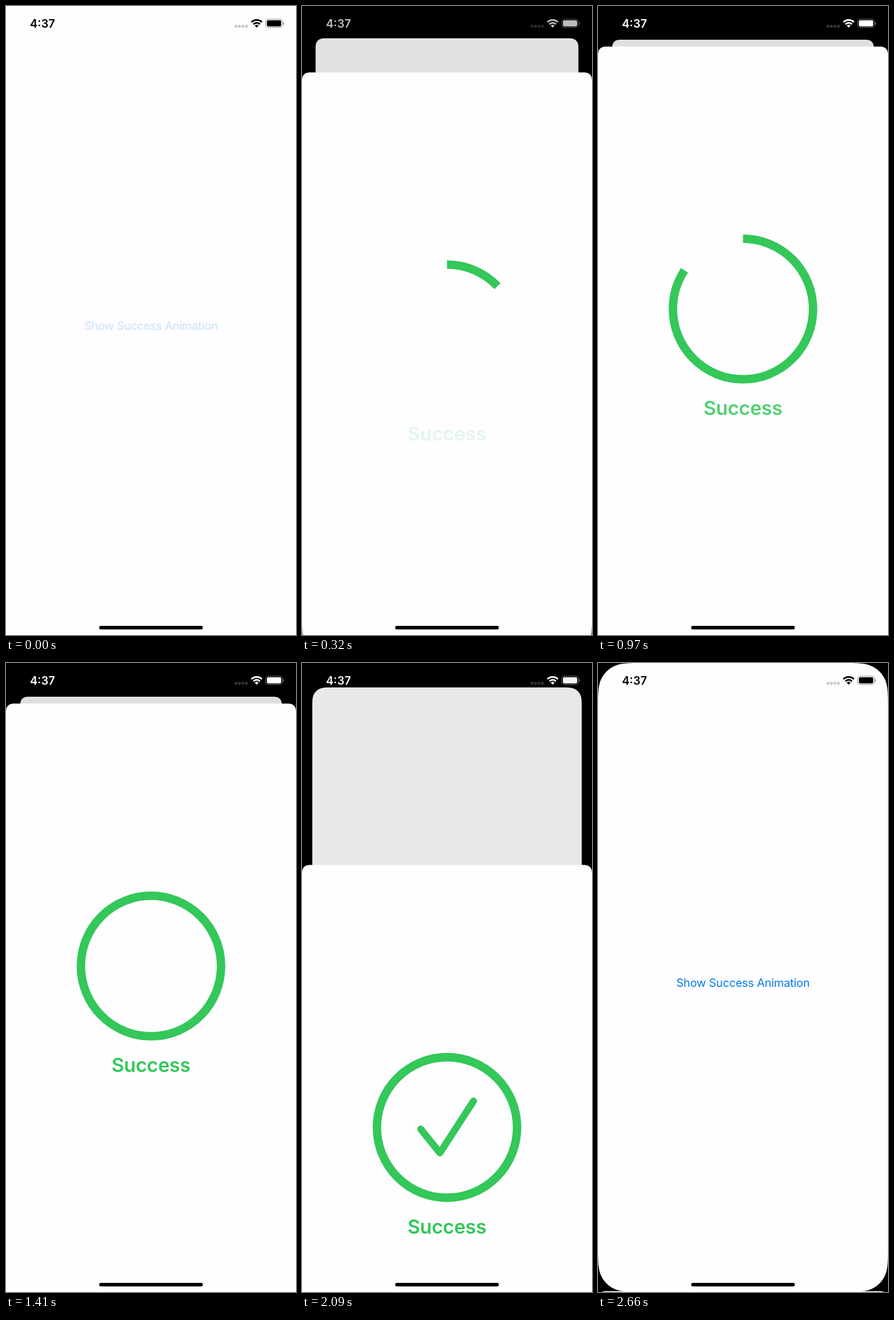
Write an HTML page with a canvas that moves like this. It is 509x1101 px and loops after 2780 ms.

```html
<!DOCTYPE html>
<html lang="en">
<head>
<meta charset="utf-8">
<title>Success animation</title>
<style>
  html, body { margin: 0; width: 100%; height: 100%; overflow: hidden; background: #000; }
  canvas { display: block; width: 509px; height: 1101px; }
</style>
</head>
<body>
<canvas id="stage"></canvas>
<script>
const W = 509, H = 1101, LOOP = 2780;
const PRESENT = 120, SETTLED = 680, DISMISS = 2010;
const WHITE = '#fefdff', GREEN = '#34c759', BLUE = '#047bec';
const SHEET_Y = 71, CARD_Y = 59, CARD_SCALE = 0.902;
const SCREEN_R = 51, CARD_R = 12.3;
const FONT = 'Inter, "Open Sans", sans-serif';

const canvas = document.getElementById('stage');
const ctx = canvas.getContext('2d');
const dpr = window.devicePixelRatio || 1;
canvas.width = Math.round(W * dpr);
canvas.height = Math.round(H * dpr);

const clamp = v => Math.min(1, Math.max(0, v));
const lerp = (a, b, k) => a + (b - a) * k;

// Ease in and out: cubic-bezier(.42, 0, .58, 1)
function ease(x) {
  x = clamp(x);
  let lo = 0, hi = 1;
  for (let i = 0; i < 24; i++) {
    const s = (lo + hi) / 2, r = 1 - s;
    if (1.26 * r * r * s + 1.74 * r * s * s + s * s * s < x) lo = s; else hi = s;
  }
  return lo * lo * (3 - 2 * lo);
}

// Critically damped spring from 0 to 1
function spring(ms, rate) {
  const a = Math.max(0, ms) * rate;
  return 1 - (1 + a) * Math.exp(-a);
}

// Steps of 40 ms with a little drift
function step(t) {
  const drift = t < 930 ? 0 : t < 2260 ? 10 : 20;
  return Math.floor((t - drift) / 40) * 40 + drift;
}

// One corner with continuous curvature; (ux, uy) points inward along the
// edge being left, (vx, vy) along the edge being entered.
function corner(x, y, ux, uy, vx, vy, r) {
  const p = (a, b) => [x + r * (a * ux + b * vx), y + r * (a * uy + b * vy)];
  ctx.lineTo(...p(1.5287, 0));
  ctx.bezierCurveTo(...p(1.0885, 0), ...p(0.8684, 0), ...p(0.6315, 0.0749));
  ctx.bezierCurveTo(...p(0.3728, 0.1691), ...p(0.1691, 0.3728), ...p(0.0749, 0.6315));
  ctx.bezierCurveTo(...p(0, 0.8684), ...p(0, 1.0885), ...p(0, 1.5287));
}

function panel(x, y, w, h, top, bottom, color) {
  ctx.beginPath();
  corner(x, y, 0, 1, 1, 0, top);
  corner(x + w, y, -1, 0, 0, 1, top);
  corner(x + w, y + h, 0, -1, -1, 0, bottom);
  corner(x, y + h, 1, 0, 0, -1, bottom);
  ctx.closePath();
  ctx.fillStyle = color;
  ctx.fill();
}

function pill(x, y, w, h, r) {
  ctx.beginPath();
  ctx.roundRect(x, y, w, h, r);
}

function label(str, x, y, font, color, align, spacing) {
  ctx.font = font + ' ' + FONT;
  ctx.fillStyle = color;
  ctx.textAlign = align;
  ctx.letterSpacing = spacing;
  ctx.fillText(str, x, y);
}

function drawHome(p, faint) {
  const s = lerp(1, CARD_SCALE, p), r = lerp(SCREEN_R, CARD_R, p);
  const x = W * (1 - s) / 2, y = CARD_Y * p;
  if (faint) {
    ctx.fillStyle = WHITE;
    ctx.fillRect(0, 0, W, H);
  } else {
    panel(x, y, W * s, H * s, r, r, WHITE);
  }
  ctx.save();
  ctx.translate(x, y);
  ctx.scale(s, s);
  ctx.globalAlpha = faint ? 0.21 : 1;
  label('Show Success Animation', W / 2, 567, '400 20px', BLUE, 'center', '-0.2px');
  ctx.restore();
  if (!faint) panel(x, y, W * s, H * s, r, r, `rgba(0,0,0,${0.12 * p})`);
}

function drawCheck(k) {
  const a = [208.4, 462.4], b = [242, 503.9], c = [301, 413.3];
  const first = Math.hypot(b[0] - a[0], b[1] - a[1]);
  const second = Math.hypot(c[0] - b[0], c[1] - b[1]);
  const len = k * (first + second);
  const along = (p, q, f) => [lerp(p[0], q[0], f), lerp(p[1], q[1], f)];
  ctx.beginPath();
  ctx.moveTo(...a);
  ctx.lineTo(...along(a, b, clamp(len / first)));
  if (len > first) ctx.lineTo(...along(b, c, (len - first) / second));
  ctx.lineWidth = 12.3;
  ctx.lineCap = ctx.lineJoin = 'round';
  ctx.stroke();
}

function drawSheet(t, p) {
  const moving = t < SETTLED || t >= DISMISS;
  ctx.save();
  ctx.translate(0, lerp(H, SHEET_Y, p));
  panel(0, 0, W, H - SHEET_Y, CARD_R, moving ? SCREEN_R : 0, WHITE);

  const k = ease((t + 20) / 1366);
  ctx.strokeStyle = GREEN;
  ctx.lineWidth = 14.8;
  ctx.lineCap = 'butt';
  ctx.beginPath();
  ctx.arc(W / 2, 459.4, 123, -Math.PI / 2, -Math.PI / 2 + k * 2 * Math.PI);
  ctx.stroke();

  const check = ease((t - 1440) / 420);
  if (check > 0) drawCheck(check);

  ctx.globalAlpha = k;
  label('Success', W / 2, 645, '600 34px', GREEN, 'center', '-0.2px');
  ctx.restore();
}

function drawStatus(light) {
  const v = Math.round(255 * light), ink = `rgb(${v},${v},${v})`;
  label('4:37', 42, 38, '600 20px', ink, 'left', '0px');
  ctx.save();
  ctx.fillStyle = ctx.strokeStyle = ink;

  ctx.globalAlpha = 0.2;
  for (let i = 0; i < 4; i++) {
    pill(401 + 6.15 * i, 33, 4.9, 4.9, 1.3);
    ctx.fill();
  }

  // Wi-Fi
  ctx.globalAlpha = 1;
  ctx.lineCap = 'butt';
  ctx.lineWidth = 3;
  const from = -Math.PI * 0.74, to = -Math.PI * 0.26;
  for (const r of [13.4, 8.4]) {
    ctx.beginPath();
    ctx.arc(440, 38, r, from, to);
    ctx.stroke();
  }
  ctx.beginPath();
  ctx.moveTo(440, 38);
  ctx.arc(440, 38, 4.9, from, to);
  ctx.fill();

  // Battery
  pill(458, 25.1, 25, 10.6, 2.6);
  ctx.fill();
  ctx.globalAlpha = 0.4;
  ctx.lineWidth = 1.2;
  pill(456, 23.1, 29, 14.6, 4.4);
  ctx.stroke();
  pill(486.4, 28.1, 1.7, 4.8, [0, 1.7, 1.7, 0]);
  ctx.fill();
  ctx.restore();
}

function draw(t) {
  ctx.setTransform(dpr, 0, 0, dpr, 0, 0);
  ctx.fillStyle = '#000';
  ctx.fillRect(0, 0, W, H);

  let p = 0, light = 0;
  if (t >= DISMISS) {
    p = 1 - spring(t - 2015, 0.0137);
    light = 1 - ease((t - 2015) / 525);
  } else if (t >= PRESENT) {
    p = t < SETTLED ? spring(t + 30, 0.014) : 1;
    light = ease((t + 20) / 525);
  }

  const idle = t < PRESENT;
  drawHome(p, idle);
  if (!idle) drawSheet(t, p);
  drawStatus(light);
  ctx.fillStyle = '#000';
  pill(163.5, 1085, 182, 6.2, 3.1);
  ctx.fill();
}

const start = performance.now();
function tick() {
  draw(step((performance.now() - start) % LOOP));
  requestAnimationFrame(tick);
}
tick();
</script>
</body>
</html>
```
